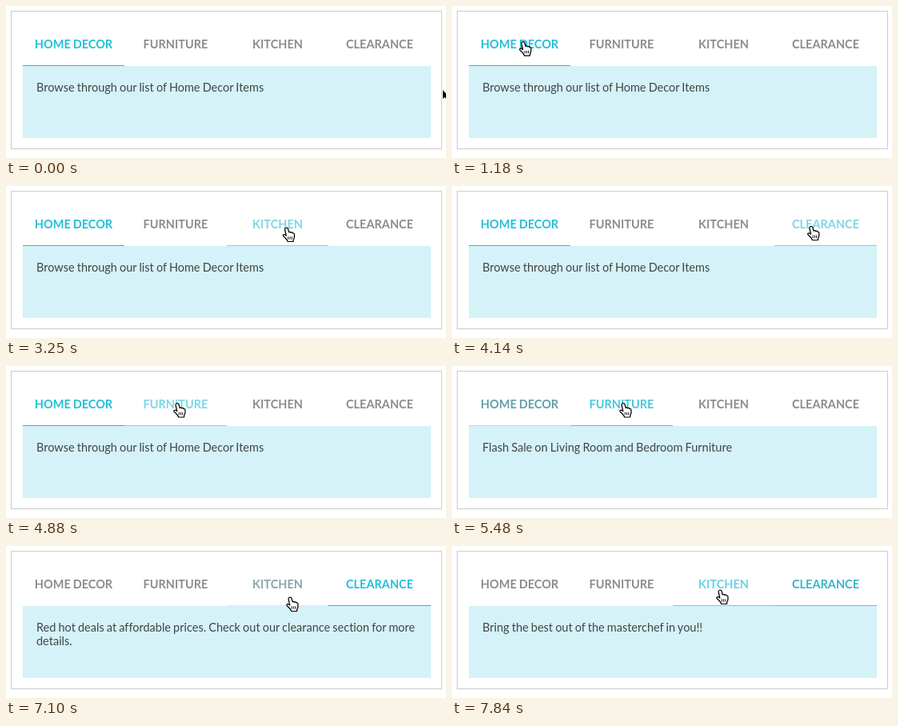
Recreate the animation shown at these times as an HTML page. Size 550 by 190 pixels, loop 7990 ms.

```html
<!DOCTYPE html>
<html lang="en">
<head>
<meta charset="utf-8">
<title>Shop tabs</title>
<style>
  html, body { margin: 0; width: 100%; height: 100%; overflow: hidden; background: #fff; }
  svg { display: block; width: 550px; height: 190px; }
  text { font: 14.5px Lato, sans-serif; word-spacing: -.6px; font-variant-ligatures: none; fill: #444; }
  .tab { font-weight: 700; text-anchor: middle; }
</style>
</head>
<body>
<svg viewBox="0 0 550 190">
  <rect x="6.5" y="6.5" width="538" height="172" fill="#fff" stroke="#ccc"/>
  <rect x="21" y="75" width="510" height="90" fill="#d4f2f8"/>
  <g id="tabs"></g>
  <text id="line1" x="38" y="107"></text>
  <text id="line2" x="38" y="124"></text>
  <g id="cursor" stroke-linejoin="round">
    <path id="arrow" d="M0 0V13L3 10.3 5 15 7 14.2 5 9.6H9Z" stroke="#fff"/>
    <g id="hand" transform="translate(-.8) scale(1.06 1)" fill="#fff" stroke="#000" stroke-width="1.2">
      <path d="M4.6.8C6 .3 6.8 1.3 7 2.3L8 6.3C8.8 5.4 10 5.8 10.2 6.8 11 6 12.2 6.4 12.4 7.5 13.4 7 14.4 7.8 14.4 9V12C14.4 14 13 15 13 18H6.5C6.3 16 4 13.5 1.5 11.2 .4 10 1.4 8.6 3 9.2L4.8 10.4 3.2 3C3 2 3.4 1.2 4.6.8Z"/>
      <path d="M7.2 11.8v3.4M9.3 11.8v3.4M11.4 11.8v3.4" stroke-width=".9"/>
    </g>
  </g>
</svg>
<script>
const LOOP = 7990, STEP = 148, LAST_STEP = 53;
const HOVER_FADE = 0.34, ACTIVE_FADE = 0.2;
const LEFT = 21, TAB_WIDTH = 127.5, PANEL_TOP = 75;
const WHITE = [255, 255, 255], IDLE = [140, 140, 140], HOVER = [125, 214, 230], ACTIVE = [38, 191, 216];

const tabs = [
  { title: 'HOME DECOR', lines: ['Browse through our list of Home Decor Items'] },
  { title: 'FURNITURE', lines: ['Flash Sale on Living Room and Bedroom Furniture'] },
  { title: 'KITCHEN', lines: ['Bring the best out of the masterchef in you!!'] },
  { title: 'CLEARANCE', lines: ['Red hot deals at affordable prices. Check out our clearance section for more', 'details.'] },
];
const clicks = [{ step: 35, tab: 1 }, { step: 43, tab: 3 }, { step: 53, tab: 2 }];

// Cursor trips: start step, end step, destination x and y
const START = [545.5, 104];
const trips = [
  [0, 3, 82, 44], [7, 14, 194, 47], [15, 21, 346, 51.5], [22, 26, 460, 50],
  [27, 31, 209.5, 46], [37, 41, 447, 52], [45, 48, 350.5, 63.5], [48, 51, 330.5, 54.5],
];

const $ = id => document.getElementById(id);
const clamp = (v, lo, hi) => Math.max(lo, Math.min(hi, v));
const lerp = (a, b, k) => a + (b - a) * k;
const mix = (a, b, k) => a.map((v, i) => lerp(v, b[i], k));
const rgb = c => `rgb(${c.map(Math.round)})`;
const approach = (v, goal, rate) => v + clamp(goal - v, -rate, rate);

function add(name, attrs, text = '') {
  const el = document.createElementNS('http://www.w3.org/2000/svg', name);
  for (const key in attrs) el.setAttribute(key, attrs[key]);
  el.textContent = text;
  return $('tabs').appendChild(el);
}

const edge = i => Math.floor(LEFT + i * TAB_WIDTH);
const views = tabs.map(({ title }, i) => ({
  label: add('text', { class: 'tab', x: LEFT + (i + 0.5) * TAB_WIDTH - 0.25, y: 53 }, title),
  line: add('rect', { x: edge(i), y: PANEL_TOP - 1, width: edge(i + 1) - edge(i), height: 1 }),
}));

function cursorAt(step) {
  return trips.reduce((pos, [from, to, ...goal]) => {
    const k = clamp((step - from) / (to - from), 0, 1);
    return mix(pos, goal, k * k);
  }, START);
}

function hoveredTab([x, y]) {
  return y < PANEL_TOP ? Math.floor((x + 5 - LEFT) / TAB_WIDTH) : -1;
}

function activeTab(step) {
  return clicks.reduce((tab, click) => step >= click.step ? click.tab : tab, 0);
}

function draw(step) {
  const levels = tabs.map((_, i) => ({ hover: 0, active: +(i === 0) }));
  for (let s = 0; s <= step; s++) {
    const hovered = hoveredTab(cursorAt(s)), active = activeTab(s);
    levels.forEach((level, i) => {
      level.hover = approach(level.hover, +(i === hovered), HOVER_FADE);
      level.active = approach(level.active, +(i === active), ACTIVE_FADE);
    });
  }
  levels.forEach(({ hover, active }, i) => {
    const shade = base => rgb(mix(mix(base, HOVER, hover), ACTIVE, active));
    views[i].label.style.fill = shade(IDLE);
    views[i].line.style.fill = shade(WHITE);
  });

  const [line1, line2 = ''] = tabs[activeTab(step)].lines;
  $('line1').textContent = line1;
  $('line2').textContent = line2;

  const pos = cursorAt(step), overTab = hoveredTab(pos) >= 0;
  $('cursor').setAttribute('transform', `translate(${pos})`);
  $('hand').style.display = overTab ? '' : 'none';
  $('arrow').style.display = overTab ? 'none' : '';
}

function tick() {
  const t = performance.now() % LOOP;
  draw(Math.min(LAST_STEP, Math.floor((t + 18) / STEP)));
  requestAnimationFrame(tick);
}
tick();
</script>
</body>
</html>
```
